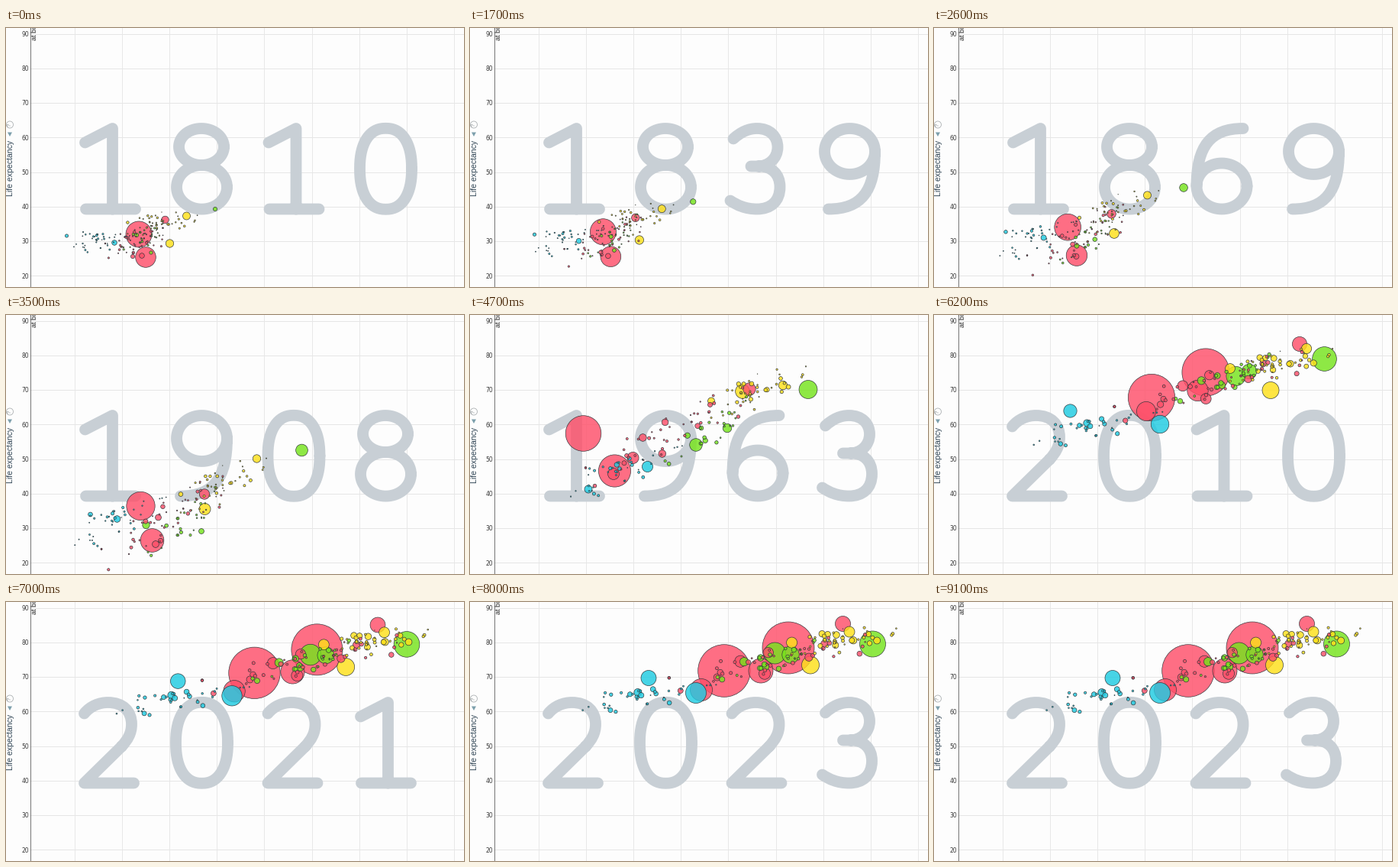
Write a matplotlib script that moves like this. It is 600 px wide and 339 px high and loops after 9200 ms.

```python
import numpy as np
import matplotlib.pyplot as plt
from matplotlib.animation import FuncAnimation
from matplotlib.colors import to_rgba
from matplotlib.patches import Circle, PathPatch, Polygon
from matplotlib.path import Path

W, H, DPI = 600, 339, 100
PX = 72 / DPI
FRAMES, INTERVAL = 92, 100
RED, CYAN, YELLOW, GREEN = "#ff4f69", "#1fcbe2", "#ffe01a", "#76e41c"
DIGIT_X = (136.5, 256.5, 377, 497.5)

# Pace of the year counter: frame, year and years per frame at each knot.
KNOTS = np.array([0, 17, 35, 47, 62, 75])
YEARS = np.array([1810, 1839, 1908, 1963, 2010, 2023])
SPEED = np.array([0.9, 2.6, 4.6, 4.4, 1.9, 0])
STAGES = np.array([1810, 1908, 1963, 2010, 2023])

rng = np.random.default_rng(5)
bubbles = []


def year_at(frame):
    """Cubic Hermite through the pace knots, then hold."""
    if frame >= KNOTS[-1]:
        return float(YEARS[-1])
    i = np.searchsorted(KNOTS, frame, side="right") - 1
    span = KNOTS[i + 1] - KNOTS[i]
    u = (frame - KNOTS[i]) / span
    return ((2*u**3 - 3*u**2 + 1) * YEARS[i] + (u**3 - 2*u**2 + u) * span * SPEED[i]
            + (3*u**2 - 2*u**3) * YEARS[i + 1] + (u**3 - u**2) * span * SPEED[i + 1])


def country(color, r0, r1, *path, growth=3, offset=(0, 0), spread=(0, 0)):
    """A bubble on a path of stage points; its radius grows from r0 to r1."""
    bubbles.append((path, (r0, r1, growth), offset, spread, to_rgba(color, 0.82)))


def region(color, count, spread, *path):
    """Many smaller countries scattered around a shared path."""
    for _ in range(count):
        offset = np.clip(rng.normal(size=2), -1.9, 1.9)
        size = min(rng.lognormal(0, 0.65), 4)
        country(color, 0.8 * size ** 0.6, 1.9 * size, *path,
                growth=2, offset=offset, spread=spread)


# The largest countries
country(RED, 17, 34, (174, 270), (176.5, 250), (148.5, 155), (356, 75), (417, 60))
country(RED, 13.3, 34.3, (183, 300), (191.5, 295), (189.5, 204), (285, 108), (333, 90))
country(RED, 2.6, 16, (166, 299), (199.5, 265), (213.5, 187), (345.5, 99), (381, 90))
country(RED, 3.3, 14.5, (178, 298), (196, 300), (188, 208), (278, 126), (303, 115))
country(RED, 4.8, 10, (208.5, 251), (260, 234.5), (366, 97), (479, 38), (488.5, 28.5), growth=1.3)
country(YELLOW, 5.2, 11.5, (214.5, 282), (260.5, 254), (357, 100), (441, 98.5), (446, 82.5), growth=1.3)
country(YELLOW, 5, 7, (236.5, 246), (328.5, 188), (410, 92), (488, 44), (497, 39))
country(GREEN, 2.6, 17, (274, 237), (387.5, 177), (443, 97.5), (511.5, 57.5), (527.5, 55), growth=1.3)
country(GREEN, 2.2, 14, (190, 294), (183.5, 275), (296, 170), (395.5, 80), (399.5, 67), growth=2)
country(GREEN, 2.6, 11.2, (171, 271), (256, 283), (337, 148), (413, 74), (420, 69))
country(CYAN, 3.3, 13.5, (142, 281), (145.5, 267), (232.5, 198.5), (296, 143), (296, 119))
country(CYAN, 2.1, 10, (79.5, 272), (110.5, 261), (155, 228), (178.5, 125.5), (234, 99.5))

region(CYAN, 38, (19, 46), (125, 277), (150, 265), (205, 200), (215, 145), (235, 122))
region(RED, 46, (20, 68), (168, 279), (205, 270), (255, 158), (360, 92), (390, 78))
region(YELLOW, 42, (24, 36), (205, 256), (285, 221), (378, 99), (455, 64), (490, 50))
region(GREEN, 24, (18, 42), (182, 270), (235, 267), (315, 148), (385, 80), (395, 74))

paths, radii, offsets, spreads, rgba = (np.array(part, float) for part in zip(*bubbles))


def state(year):
    """Centres and radii of all bubbles in the given year."""
    i = min(np.searchsorted(STAGES, year, side="right") - 1, len(STAGES) - 2)
    u = (year - STAGES[i]) / (STAGES[i + 1] - STAGES[i])
    if i == 0:
        u **= 1.5  # slow start of the industrial age
    xy = (1 - u) * paths[:, i] + u * paths[:, i + 1]
    s = (year - YEARS[0]) / (YEARS[-1] - YEARS[0])
    hump = np.sin(np.pi * s)
    width = spreads[:, 0] + (spreads[:, 1] - spreads[:, 0]) * s
    dx = offsets[:, 0] * width
    dy = offsets[:, 1] * (8 + 5 * hump) * (width > 0) - dx * (0.2 + 0.35 * hump)
    dip = 28 * np.exp(-((year - 1918) / 1.2) ** 2)
    r0, r1, growth = radii.T
    return xy + np.column_stack([dx, dy + dip]), r0 + (r1 - r0) * s ** growth


def line(*points):
    return Path(points)


def curve(*points):
    return Path(points, [Path.MOVETO] + [Path.CURVE4] * (len(points) - 1))


def oval(cx, cy, rx, ry, power=2.0):
    t = np.linspace(0, 2 * np.pi, 73)
    bend = lambda v: np.sign(v) * np.abs(v) ** (2 / power)
    return Path(np.column_stack([cx + rx * bend(np.cos(t)), cy + ry * bend(np.sin(t))]))


TOP, BASE = 131.5, 237
GLYPHS = {
    "0": [oval(0, 184.3, 34, 53, 2.3)],
    "1": [line((-33, 150), (3, TOP), (3, BASE)), line((-32, BASE), (33, BASE))],
    "2": [curve((-34, 146), (-26, 136), (-14, TOP), (-3, TOP),
                (17, TOP), (28, 143), (28, 160), (28, 172), (23, 180), (15, 189)),
          line((15, 189), (-34, BASE), (31, BASE))],
    "3": [curve((-32, 145), (-22, 136), (-12, TOP), (-1, TOP),
                (16, TOP), (26, 142), (26, 156), (26, 171), (14, 181), (0, 181)),
          line((-9, 181), (2, 181)),
          curve((2, 181), (18, 181), (29, 191), (29, 208), (29, 227), (17, BASE), (-1, BASE),
                (-16, BASE), (-27, 232), (-36, 226))],
    "4": [line((8, TOP), (-35, 211), (36, 211)), line((16, 178), (16, BASE))],
    "5": [line((26, TOP), (-22, TOP), (-27, 180)),
          curve((-27, 180), (-18, 173), (-10, 171), (0, 171), (20, 171), (31, 184), (31, 204),
                (31, 225), (18, BASE), (-2, BASE), (-15, BASE), (-27, 233), (-35, 226))],
    "6": [oval(0, 207, 33, 30), curve((-33, 207), (-33, 155), (-15, TOP), (28, TOP))],
    "7": [line((-34, TOP), (34, TOP), (-12, BASE))],
    "8": [oval(-0.5, 155.5, 29.5, 24), oval(0, 208.3, 33, 28.8)],
    "9": [oval(0, 161.5, 33, 30), curve((33, 161.5), (33, 214), (15, BASE), (-28, BASE))],
}
GLYPHS = {k: Path.make_compound_path(*parts) for k, parts in GLYPHS.items()}

plt.rcParams["font.family"] = "Liberation Sans"
fig = plt.figure(figsize=(W / DPI, H / DPI), dpi=DPI, facecolor="#fdfdfd")
ax = fig.add_axes([0, 0, 1, 1])
ax.set(xlim=(0, W), ylim=(H, 0))
ax.axis("off")


def rule(xs, ys, color, z=1):
    ax.plot(xs, ys, color=color, lw=PX, snap=False, zorder=z)


for x in np.floor(90.5 + 62.1 * np.arange(9)) + 0.5:
    rule([x, x], [0, H], "#e8e8e8")
for value in range(20, 91, 10):
    y = 8 + (90 - value) * 4.527
    rule([32, W], [np.floor(y) + 0.5] * 2, "#e6e6e6")
    ax.text(30, y - 0.7, str(value), size=7.6 * PX, family="DejaVu Sans", color="#3c3c3c",
            ha="right", va="center_baseline")
rule([32.5, 32.5], [0, H], "#777777", 2)

ax.text(37, 16, "at birth", size=9 * PX, color="#222222", rotation=90,
        ha="center", va="bottom", clip_on=True)
ax.text(6, 220, "Life expectancy", size=10.5 * PX, color="#2f4454", rotation=90,
        ha="center", va="bottom")
ax.add_patch(Polygon([(2, 136.5), (8, 136.5), (5, 142)], color="#7c9fac", lw=0))
ax.add_patch(Circle((5, 126.5), 4.5, fill=False, ec="#a9aeb0", lw=0.8 * PX))
ax.text(5, 126.5, "?", size=7.5 * PX, color="#8d9397", rotation=90, ha="center", va="center")

digits = [ax.add_patch(PathPatch(GLYPHS["0"], fill=False, ec="#c8cfd5", lw=14.8 * PX,
                                 capstyle="round", joinstyle="round", zorder=3))
          for _ in DIGIT_X]
dots = ax.scatter(*paths[:, 0].T, lw=0.65 * PX, edgecolors="#2d3438", zorder=4)


def update(frame):
    year = year_at(frame)
    for patch, x, char in zip(digits, DIGIT_X, str(round(year))):
        glyph = GLYPHS[char]
        patch.set_path(Path(glyph.vertices + (x, 0), glyph.codes))
    xy, r = state(year)
    order = np.argsort(-r, kind="stable")  # large bubbles at the back
    dots.set_offsets(xy[order])
    dots.set_sizes((2 * r[order] * PX) ** 2)
    dots.set_facecolors(rgba[order])
    return [*digits, dots]


anim = FuncAnimation(fig, update, frames=FRAMES, interval=INTERVAL, repeat=True,
                     repeat_delay=0, blit=False)
plt.show()
```
